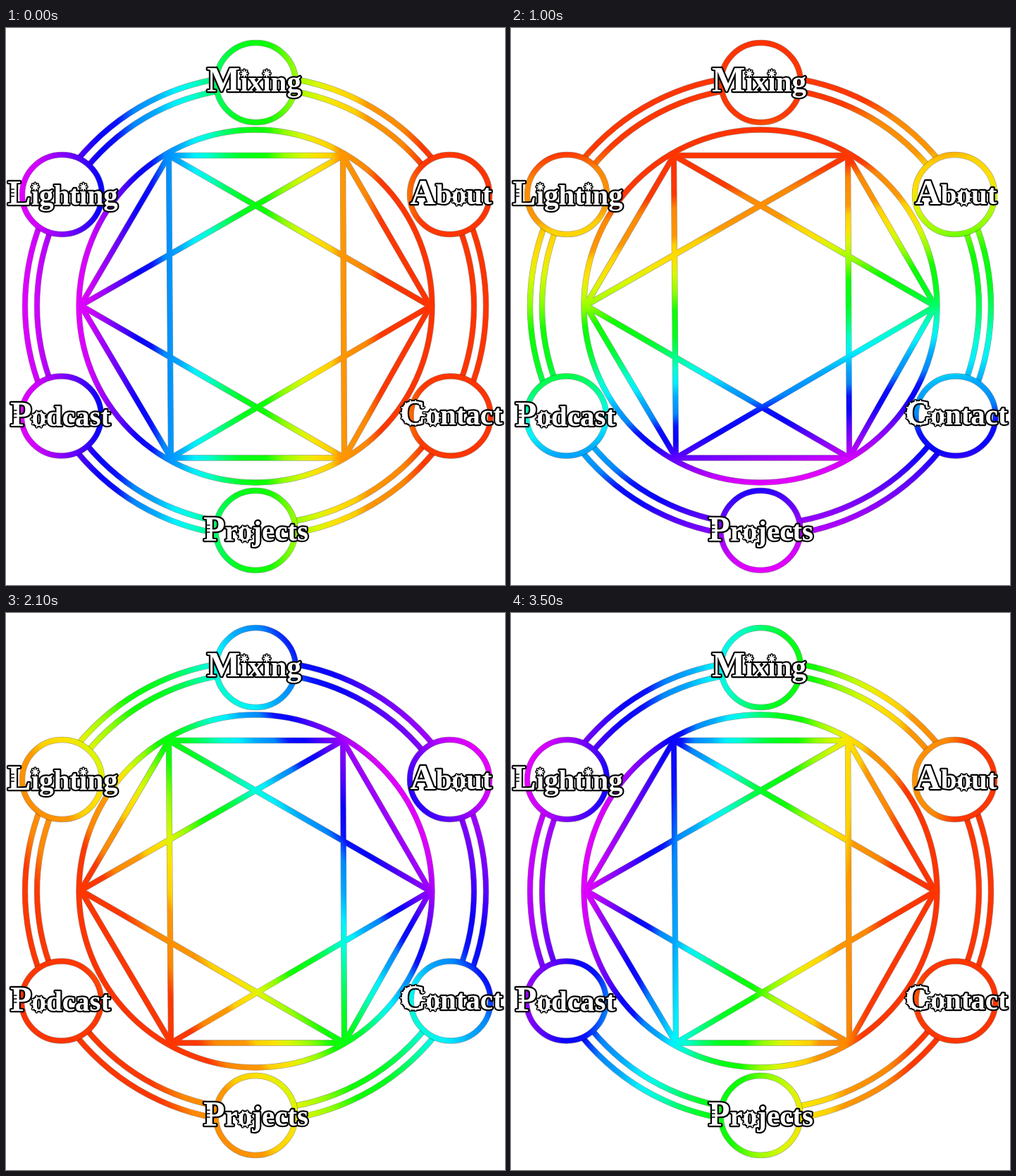
Recreate the animation shown at these times as an HTML page with a canvas. Size 708 px wide and 791 px high, loop 3600 ms.

```html
<!DOCTYPE html>
<html lang="en">
<head>
<meta charset="utf-8">
<title>Colour wheel menu</title>
<style>
html, body { margin: 0; width: 100%; height: 100%; overflow: hidden; background: #fff; }
canvas { display: block; width: 708px; height: 791px; }
</style>
</head>
<body>
<canvas id="stage" width="708" height="791"></canvas>
<script>
const W = 708, H = 791, CX = 354, CY = 395;
const STEP = 100, STEPS = 36;
const ctx = document.getElementById('stage').getContext('2d');

const spectrum = [
  [0, '#e600ff'], [.04, '#d000ff'], [.08, '#9a00ff'], [.13, '#5500ff'],
  [.17, '#0a00ff'], [.21, '#0a10ff'], [.245, '#0088ff'], [.29, '#00aaff'],
  [.33, '#00f0ff'], [.37, '#00ffd0'], [.42, '#00ff60'], [.46, '#00ff20'],
  [.53, '#10ff00'], [.58, '#90ff00'], [.63, '#d8f800'], [.67, '#ffe000'],
  [.71, '#ffd000'], [.735, '#ff9800'], [.81, '#ff8800'], [.85, '#ff3800'], [1, '#ff3300']
];

// label, circle centre, text centre and baseline
const nodes = [
  ['Mixing', 354.5, 77.5, 352, 90],
  ['About', 629.5, 236.5, 631.5, 250],
  ['Contact', 631, 551, 632, 563],
  ['Projects', 354, 713.5, 354.5, 728],
  ['Podcast', 78.5, 551, 77, 565],
  ['Lighting', 79.5, 236.5, 80.5, 251]
];

const corners = [[231, 181], [478, 181], [602, 395], [480, 610.5], [234, 610.5], [106, 394]];

function addCircle(path, x, y, r) {
  path.moveTo(x + r, y);
  path.arc(x, y, r, 0, Math.PI * 2);
}

const rings = new Path2D();
for (const r of [327, 310]) addCircle(rings, CX, CY, r);

const badges = new Path2D();
for (const [, x, y] of nodes) addCircle(badges, x, y, 56.5);

const star = new Path2D();
addCircle(star, CX, CY, 250.5);
corners.forEach((p, i) => {
  for (const skip of [1, 2]) {
    star.moveTo(...p);
    star.lineTo(...corners[(i + skip) % 6]);
  }
});

// how far the outer wheel reaches along a direction
function reachAt(angle) {
  const ux = Math.cos(angle), uy = -Math.sin(angle);
  const along = nodes.map(([, x, y]) => Math.abs((x - CX) * ux + (y - CY) * uy));
  return Math.max(...along) + 60.5;
}

function spin(angle, reach) {
  const dx = Math.cos(angle) * reach;
  const dy = -Math.sin(angle) * reach;
  const g = ctx.createLinearGradient(CX - dx, CY - dy, CX + dx, CY + dy);
  for (const [at, color] of spectrum) g.addColorStop(at, color);
  return g;
}

function trace(path, paint) {
  ctx.strokeStyle = 'rgba(0,0,0,.42)';
  ctx.lineWidth = 8.4;
  ctx.stroke(path);
  ctx.strokeStyle = paint;
  ctx.lineWidth = 7.4;
  ctx.stroke(path);
}

function burst(c, x, y, rx, ry, count, reach) {
  c.beginPath();
  for (let i = 0; i < count; i++) {
    const a = i / count * Math.PI * 2;
    const ux = Math.cos(a), uy = Math.sin(a);
    c.moveTo(x + ux * rx, y + uy * ry);
    c.lineTo(x + ux * (rx + reach), y + uy * (ry + reach));
  }
  c.stroke();
}

// whimsical spikes on round letters and dots
function spikes(c, g, y) {
  const mid = g.x + g.w / 2;
  if (g.ch === 'i') burst(c, mid, y - 25.5, 1, 1, 8, 4);
  if (g.ch === 'o') burst(c, mid, y - 9.5, 8.5, 9, 10, 2.5);
  if (g.ch === 'C') burst(c, mid, y - 16.5, 15, 15.5, 14, 2.5);
}

function drawLabel(c, text, center, y) {
  const glyphs = [];
  let x = 0;
  [...text].forEach((ch, i) => {
    const font = `bold ${i ? 41 : 50}px "Liberation Serif", "Times New Roman", serif`;
    c.font = font;
    const w = c.measureText(ch).width;
    glyphs.push({ ch, font, x, w });
    x += w;
  });
  for (const g of glyphs) g.x += center - x / 2;

  c.lineJoin = c.lineCap = 'round';
  c.strokeStyle = '#000';
  for (const g of glyphs) {
    c.font = g.font;
    c.lineWidth = 4.4;
    c.strokeText(g.ch, g.x, y);
    spikes(c, g, y);
  }
  c.fillStyle = c.strokeStyle = '#fff';
  c.lineWidth = 1.6;
  for (const g of glyphs) {
    c.font = g.font;
    c.fillText(g.ch, g.x, y);
    spikes(c, g, y);
  }

  if ('LP'.includes(text[0])) {
    c.strokeStyle = '#000';
    c.lineWidth = 1.5;
    c.beginPath();
    for (let k = 0; k < 3; k++) {
      c.moveTo(glyphs[0].x + 5, y - 12 - k * 5);
      c.lineTo(glyphs[0].x + 9, y - 12 - k * 5);
    }
    c.stroke();
  }
}

const labels = document.createElement('canvas');
labels.width = W;
labels.height = H;
const lc = labels.getContext('2d');
for (const [text, , , x, y] of nodes) drawLabel(lc, text, x, y);

function draw(step) {
  const angle = step / STEPS * Math.PI * 2;
  const outer = spin(angle, reachAt(angle));
  ctx.fillStyle = '#fff';
  ctx.fillRect(0, 0, W, H);
  trace(rings, outer);
  ctx.fill(badges);
  trace(badges, outer);
  trace(star, spin(angle, 254));
  ctx.drawImage(labels, 0, 0);
}

let shown = -1;
function tick() {
  const step = Math.floor(performance.now() / STEP) % STEPS;
  if (step !== shown) draw(shown = step);
  requestAnimationFrame(tick);
}
tick();
</script>
</body>
</html>
```
